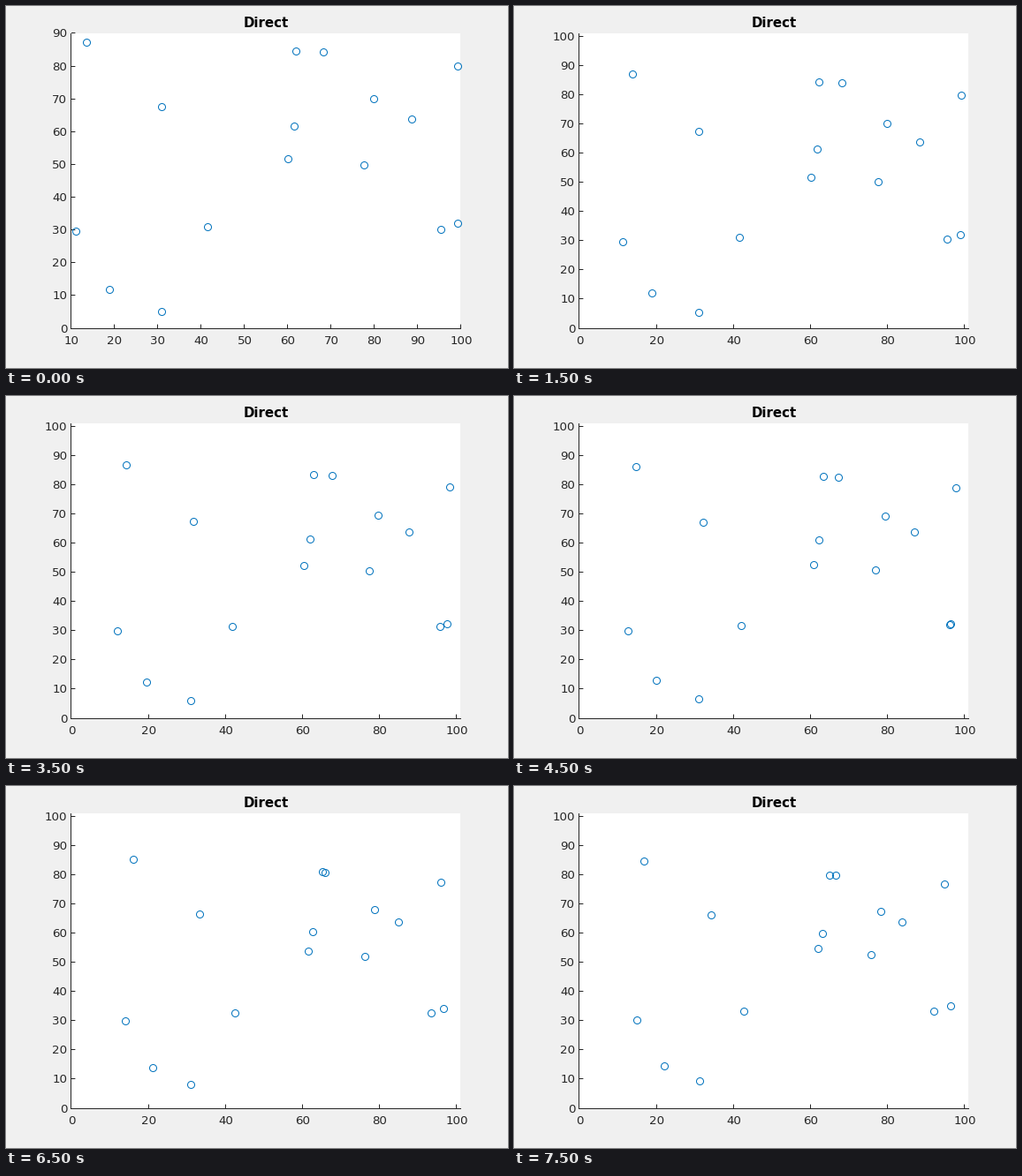
Write a matplotlib script that moves like this. It is 568x410 px and loops after 8000 ms.

```python
import numpy as np
import matplotlib.pyplot as plt
from matplotlib.animation import FuncAnimation
from matplotlib.patches import Circle, Rectangle

W, H, DPI = 568, 410, 64
PX = 72 / DPI  # one pixel in points
FRAMES, INTERVAL = 16, 500
INK, BLUE = "#262626", "#0072bd"

# Plot box in pixels and the two axis ranges (x0, x1, y0, y1)
LEFT, BASE, BOX_W, BOX_H = 73.84, 365.05, 440.2, 334.15
TIGHT = (10, 100, 0, 90)
WIDE = (0, 101, 0, 101)

START = [
    (13.57, 87.22), (11.10, 29.73), (18.79, 11.87), (30.90, 67.60),
    (30.92, 5.10), (41.52, 31.06), (60.08, 51.68), (61.57, 61.59),
    (61.96, 84.53), (68.30, 84.32), (77.70, 49.92), (79.95, 70.14),
    (88.72, 63.80), (95.51, 30.19), (99.38, 32.06), (99.41, 80.00),
]
PULL = 1 / (2 * np.pi)  # equal masses, planar gravity falling off as 1/r
SOFT = 0.5              # keeps close passes finite


def simulate():
    """Positions of all bodies at every step, starting from rest."""
    pos = np.array(START)
    vel = np.zeros_like(pos)
    path = [pos]
    for _ in range(FRAMES - 1):
        gap = pos[None] - pos[:, None]
        dist2 = (gap ** 2).sum(axis=2, keepdims=True) + SOFT ** 2
        vel = vel + PULL * (gap / dist2).sum(axis=1)
        pos = pos + vel
        path.append(pos)
    return path


def to_px(x, y, lim):
    x0, x1, y0, y1 = lim
    return (LEFT + (x - x0) / (x1 - x0) * BOX_W,
            BASE - (y - y0) / (y1 - y0) * BOX_H)


fig = plt.figure(figsize=(W / DPI, H / DPI), dpi=DPI, facecolor="#f0f0f0")
ax = fig.add_axes([0, 0, 1, 1])
ax.set_xlim(0, W)
ax.set_ylim(H, 0)
ax.axis("off")


def fill(x, y, w, h, color):
    return ax.add_patch(Rectangle((x, y), w, h, fc=color, ec="none",
                                  snap=False))


def label(x, y, text, ha="center", size=13.333, color=INK, **kw):
    return ax.text(x, y, text, ha=ha, va="baseline", fontsize=size * PX,
                   family="DejaVu Sans", color=color, **kw)


def draw_scale(lim, xticks, yticks, tick=4.4):
    parts = []
    for v in xticks:
        x = int(to_px(v, 0, lim)[0])
        parts += [fill(x, 365 - tick, 1, tick, INK),
                  label(x + 1, 383, str(v))]
    for v in yticks:
        y = int(to_px(0, v, lim)[1])
        parts += [fill(74, y, tick, 1, INK),
                  label(69.3, y + 5, str(v), ha="right")]
    return parts


fill(73, 31, 441, 334, "white")
fill(73, 31, 1, 335, INK)
fill(73, 365, 442, 1, INK)
label(294, 24, "Direct", size=15, weight="bold", color="black")

tight = draw_scale(TIGHT, range(10, 101, 10), range(0, 91, 10))
wide = draw_scale(WIDE, range(0, 101, 20), range(0, 101, 10))

path = simulate()
dots = [ax.add_patch(Circle((0, 0), 4, fill=False, ec=BLUE, lw=PX, zorder=5))
        for _ in START]


def update(t):
    first = t == 0
    for part in tight:
        part.set_visible(first)
    for part in wide:
        part.set_visible(not first)
    for dot, (x, y) in zip(dots, path[t]):
        px, py = to_px(x, y, TIGHT if first else WIDE)
        dot.center = round(px) + 0.5, round(py) + 0.5
    return dots


anim = FuncAnimation(fig, update, frames=FRAMES, interval=INTERVAL,
                     repeat=True, repeat_delay=0, blit=False)
plt.show()
```
